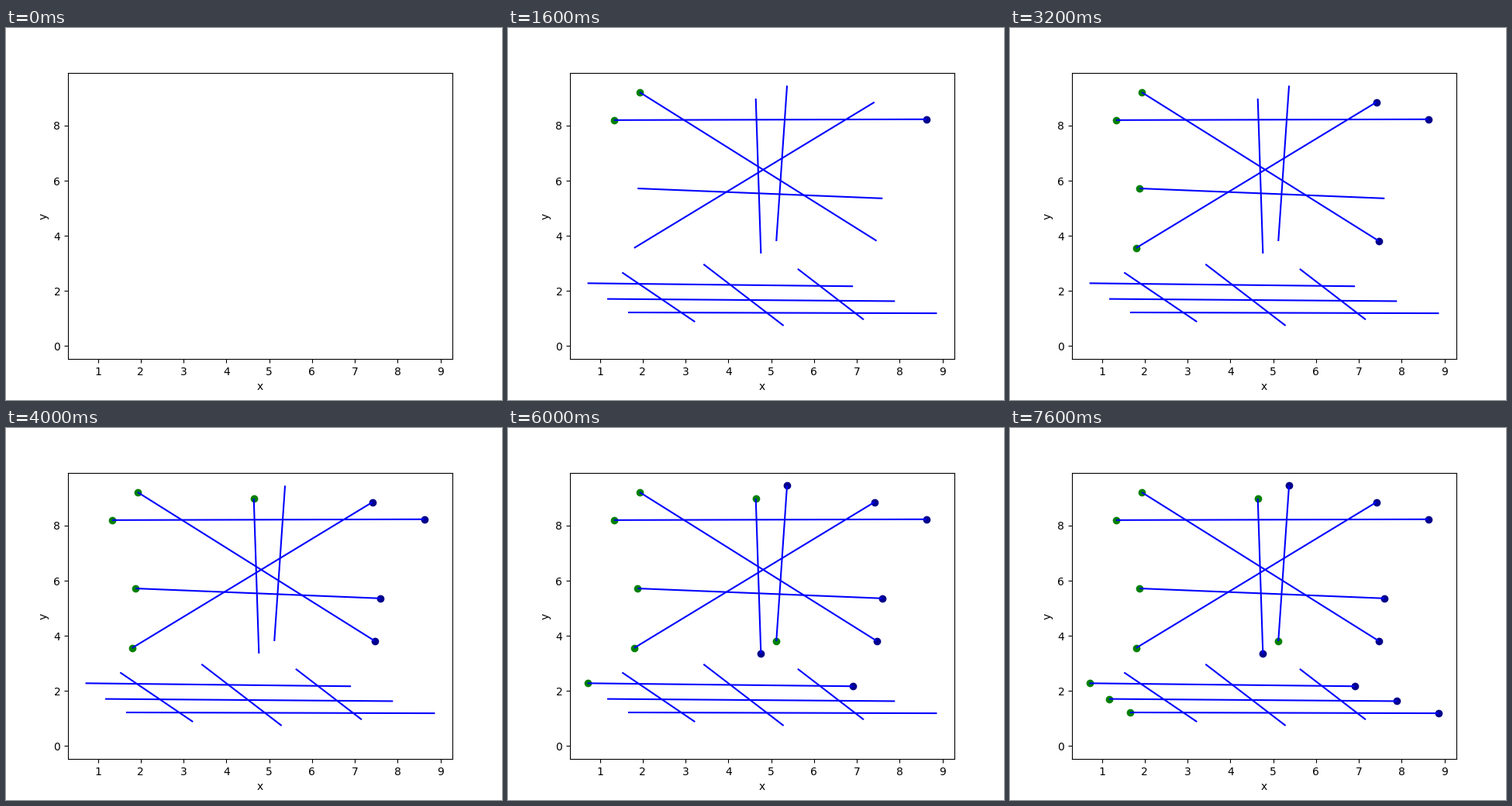
Write a matplotlib script that moves like this. It is 640 px wide and 480 px high and loops after 8 s.

```python
import matplotlib.pyplot as plt
import numpy as np
from matplotlib.animation import FuncAnimation
from matplotlib.collections import LineCollection

WIDTH, HEIGHT, DPI = 640, 480, 100
FRAMES, INTERVAL = 20, 400


def row(i):
    """One of the three nearly level lines, stepping right and down."""
    start = (0.71 + 0.445 * i + 0.015 * i**2, 2.28 - 0.61 * i + 0.04 * i**2)
    end = (6.91 + 0.98 * i, 2.17 - 0.59 * i + 0.05 * i**2)
    return start, end


upper = [
    ((1.33, 8.20), (8.63, 8.23)),
    ((1.93, 9.21), (7.46, 3.82)),
    ((1.80, 3.56), (7.41, 8.85)),
    ((1.88, 5.72), (7.60, 5.36)),
    ((4.64, 8.98), (4.76, 3.36)),
    ((5.12, 3.81), (5.37, 9.45)),
]
rows = [row(i) for i in range(3)]
slants = [
    ((1.52, 2.67), (3.22, 0.88)),
    ((3.42, 2.97), (5.29, 0.74)),
    ((5.62, 2.80), (7.16, 0.96)),
]
segments = np.array(upper + rows + slants)


def padded(low, high):
    margin = 0.05 * (high - low)
    return low - margin, high + margin


fig, ax = plt.subplots(figsize=(WIDTH / DPI, HEIGHT / DPI), dpi=DPI)
ax.set_xlim(padded(segments[..., 0].min(), segments[..., 0].max()))
ax.set_ylim(padded(0, segments[..., 1].max()))
ax.set_xlabel("x")
ax.set_ylabel("y")

lines = ax.add_collection(LineCollection(segments, colors="blue", linewidths=1.5))

# Ends are marked in sweep order: start, then end, segment by segment.
dots = [
    ax.scatter(*point, color=color)
    for segment in segments
    for point, color in zip(segment, ("green", "darkblue"))
]


def update(frame):
    lines.set_visible(frame >= 1)
    for i, dot in enumerate(dots):
        dot.set_visible(i < frame - 1)
    return [lines, *dots]


anim = FuncAnimation(fig, update, frames=FRAMES, interval=INTERVAL,
                     repeat=True, repeat_delay=0)
plt.show()
```
